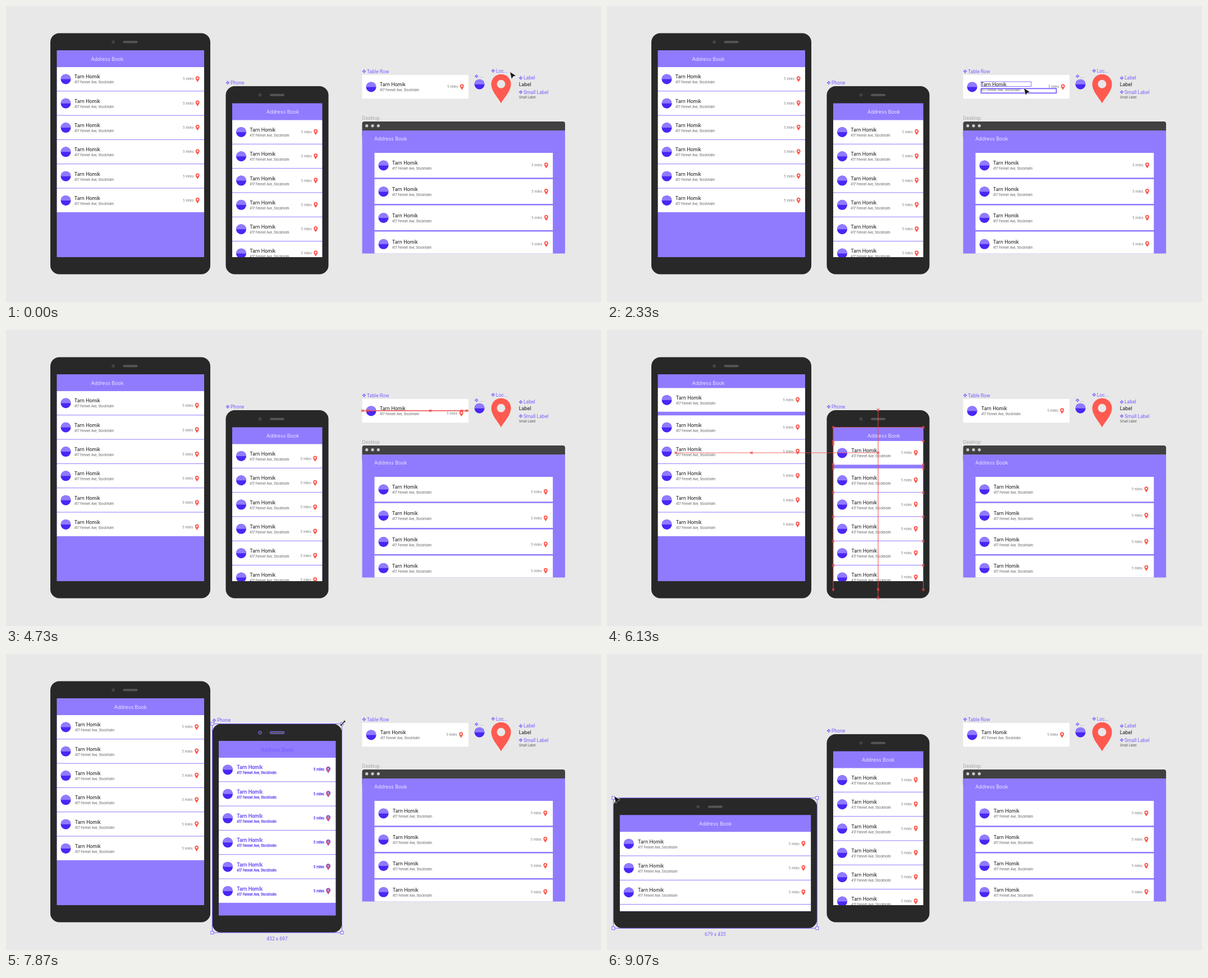
Write an HTML page that moves like this. It is 1060x528 px and loops after 9.13 s.

```html
<!DOCTYPE html>
<html lang="en">
<head>
<meta charset="utf-8">
<title>Address Book</title>
<style>
  html, body { margin: 0; width: 100%; height: 100%; overflow: hidden; background: #e8e8e8; }
  svg { display: block; width: 1060px; height: 528px; }
  text { font-family: Inter, sans-serif; }
  .title { font-size: 9px; font-weight: 300; fill: #fff; }
  .name { font-size: 8.5px; fill: #111; }
  .small { font-size: 5.55px; fill: #555; }
  .miles { font-size: 5.7px; fill: #777; }
  .tag { font-family: Roboto, sans-serif; font-size: 8.6px; fill: #7b61ff; }
  .outlined text { fill: #6248f2; stroke: #6248f2; stroke-width: .3px; }
  .outlined .title { fill: #806aff; stroke: #755eff; }
  .outlined .pin { stroke: #6248f2; stroke-width: 5px; }
  .outlined .detail { stroke: #7b61ff; stroke-width: 1px; }
</style>
</head>
<body>
<svg id="stage" viewBox="0 0 1060 528"></svg>
<script>
const LOOP = 9130;
const PURPLE = '#907bff', ACCENT = '#7b61ff', RED = '#ef4545', DARK = '#282828';
const PITCH = 43.3, ROW_HEIGHT = 42.3;
const PERSON = 'Tarn Homik', ADDRESS = '417 Fennet Ave, Stockholm';
const TABLET = [79, 48.5, 285, 430], TABLET_WIDE = [11.3, 256.7, 363, 232.5];
const PHONE = [391.5, 143, 183, 335.5], PHONE_LARGE = [367.5, 124.5, 231, 372.5];

const stage = document.getElementById('stage');
const mix = (a, b, k) => a + (b - a) * k;
const mixBox = (a, b, k) => a.map((v, i) => mix(v, b[i], k));
const between = (t, a, b) => t >= a && t < b;

function ease(t, start, end) {
  const k = Math.min(1, Math.max(0, (t - start) / (end - start)));
  return k * k * (3 - 2 * k);
}

// Eased position along a list of [time, x, y] stops.
function along(stops, t) {
  let i = 0;
  while (i < stops.length - 2 && t >= stops[i + 1][0]) i++;
  const [a, b] = [stops[i], stops[i + 1]], k = ease(t, a[0], b[0]);
  return [mix(a[1], b[1], k), mix(a[2], b[2], k)];
}

const rect = (x, y, w, h, fill, extra = '') =>
  `<rect x="${x}" y="${y}" width="${w}" height="${h}" fill="${fill}" ${extra}/>`;
const circle = (x, y, r, fill, extra = '') =>
  `<circle cx="${x}" cy="${y}" r="${r}" fill="${fill}" ${extra}/>`;
const text = (x, y, cls, value, extra = '') =>
  `<text x="${x}" y="${y}" class="${cls}" ${extra}>${value}</text>`;
const path = (d, extra) => `<path d="${d}" ${extra}/>`;
const line = (x1, y1, x2, y2, width = 1) =>
  path(`M${x1} ${y1}L${x2} ${y2}`, `stroke="${RED}" stroke-width="${width}"`);
const cross = (x, y) =>
  path(`M${x - 2} ${y - 2}l4 4m0 -4l-4 4`, `stroke="${RED}" stroke-width="1.1"`);

const avatar = (x, y, r = 9) => circle(x, y, r, '#4a26f5') +
  path(`M${x - r} ${y}a${r} ${r} 0 0 1 ${2 * r} 0z`, 'fill="#8f7bff"');

// A map pin whose origin is the middle of its full height.
const pin = (x, y, scale = 1) => `<g transform="translate(${x} ${y}) scale(${scale})">` +
  path('M0 26C-4 17-17.5 5-17.5-8.5A17.5 17.5 0 0 1 17.5-8.5C17.5 5 4 17 0 26Z' +
    'M7.5-8.5A7.5 7.5 0 0 0-7.5-8.5A7.5 7.5 0 0 0 7.5-8.5Z',
    'class="pin" fill="#ff5a50" fill-rule="evenodd"') + '</g>';

const diamond = (x, y) => path(`M${x} ${y - 1.5}l1.5 1.5l-1.5 1.5l-1.5 -1.5z`, `fill="${ACCENT}"`);
const tag = (x, y, label) => text(x + 8.4, y, 'tag', label) +
  [[0, -1.9], [1.9, 0], [0, 1.9], [-1.9, 0]].map(([dx, dy]) => diamond(x + 3.5 + dx, y - 3 + dy)).join('');

function row(x, y, w, h, pose) {
  const mid = y + h / 2, right = x + w - pose.inset;
  return rect(x, y, w, h, '#fff') + avatar(x + 16, mid + .3) +
    text(x + 31.3 + pose.shift, mid - .7, 'name', PERSON) +
    text(x + 31.3 + pose.shift, mid + 8.3, 'small', ADDRESS) +
    text(right - 18.8, mid + 2.3 + pose.drop, 'miles', '5 miles', 'text-anchor="end"') +
    pin(right - 11.8, mid + .3 + pose.drop, .2);
}

function device(id, [x, y, w, h], pose, outlined) {
  const sx = x + 11.5, sy = y + 30.5, sw = w - 22.5, sh = h - 61, cx = x + w / 2;
  let rows = '';
  for (let i = 5; i >= 0; i--) {
    rows += row(sx, sy + 30 + i * PITCH - (i ? 0 : pose.lift), sw, ROW_HEIGHT, pose);
  }
  const titleX = mix(sx + 90, sx + sw / 2, pose.center);
  return `<g class="${outlined ? 'outlined' : ''}">` +
    `<clipPath id="${id}">${rect(sx, sy, sw, sh, '#000')}</clipPath>` +
    rect(x, y, w, h, DARK, 'rx="16"') +
    circle(cx - 30.5, y + 15.7, 3, '#434343', 'class="detail"') +
    rect(cx - 13, y + 13.7, 26, 4, '#555', 'rx="2" class="detail"') +
    rect(sx, sy, sw, sh, PURPLE) +
    `<g clip-path="url(#${id})">${rows}</g>` +
    text(titleX, sy + 18.5, 'title', 'Address Book', 'text-anchor="middle"') + '</g>';
}

function desktop(pose) {
  const x = 634.5, y = 206, w = 361.5;
  let out = text(x, 202.5, 'tag', 'Desktop', 'style="fill:#aaa"') +
    rect(x, y, w, 30, '#414141', 'rx="4"') + rect(x, 222, w, 219.5, PURPLE);
  for (let i = 0; i < 3; i++) out += circle(642.7 + i * 10.3, 213.7, 2.6, '#c9c9c9');
  out += text(656.3, 240.3, 'title', 'Address Book') +
    `<clipPath id="window">${rect(x, y, w, 235.5, '#000')}</clipPath><g clip-path="url(#window)">`;
  for (let i = 0; i < 4; i++) out += row(656.5, 262 + i * 46.8, 317.7, 44.2, pose);
  return out + '</g>';
}

const components = pose =>
  tag(634.5, 119.6, 'Table Row') + row(634.5, 123, 189.5, 42.3, pose) +
  tag(834.7, 128.3, '...') + avatar(843.5, 139.7) +
  tag(864.3, 118.6, 'Loc...') + pin(882, 147.7) +
  tag(913.5, 131.4, 'Label') + text(913.7, 142.8, 'name', 'Label') +
  tag(913.5, 156.6, 'Small Label') + text(913.7, 165, 'small', 'Small Label');

function selection([x, y, w, h], label) {
  let out = rect(x, y, w, h, 'none', `stroke="${ACCENT}"`);
  for (const cx of [x, x + w]) for (const cy of [y, y + h]) {
    out += rect(cx - 2.5, cy - 2.5, 5, 5, '#fff', `stroke="${ACCENT}"`);
  }
  const size = `${Math.round(w * 1.87)} x ${Math.round(h * 1.871)}`;
  return out + (label ? text(x + w / 2, y + h + 13.5, 'tag', size, 'text-anchor="middle"') : '');
}

function rowGuides(t) {
  let out = line(634.5, 144, 824, 144, 1.3);
  for (const x of [635, 644, 756, 812, 821]) out += cross(x, 144);
  if (between(t, 3200, 3700)) {
    out += line(651, 144, 651, mix(144, 215, ease(t, 3200, 3400)));
  }
  return out;
}

function phoneGuides(t, lift) {
  const [left, mid, right, top] = [403, 483, 563.5, 173.5];
  let out = line(left, top, right, top, .7) + line(mid, 142.5, mid, 478.5);
  for (const x of [left, right]) {
    out += line(x, top, x, 463) + cross(x, top) + cross(x, 203.5 - lift) + cross(x, 246 - lift);
    for (let i = 1; i < 7; i++) out += cross(x, 203.5 + i * PITCH);
  }
  out += cross(left, 203.5);
  for (const y of [142.5, 219, 463, 478]) out += cross(mid, y);
  if (t >= 6130) {
    out += line(122.5, 219, mid, 219, .8) + cross(122.5, 219) + cross(257.5, 219);
  }
  return out;
}

const arrow = ([x, y]) => `<g transform="translate(${x} ${y})">` +
  path('M0 0L10 6.3L5.3 7.7L3 12Z', 'fill="#161616" stroke="#fff" stroke-width=".9" paint-order="stroke"') + '</g>';
const resizer = (x, y, turn) => `<g transform="translate(${x} ${y}) rotate(${turn})">` +
  path('M-7 0L-3.5-3V-1H3.5V-3L7 0L3.5 3V1H-3.5V3Z', 'fill="#161616" stroke="#fff" stroke-width=".7"') + '</g>';

const PICKING = [[0, 898, 118], [150, 898, 118], [930, 775, 149], [1500, 706, 140],
  [1730, 706, 140], [2250, 743, 147], [2730, 743, 147]];
const TO_PHONE = [[6700, 634, 168], [7000, 576, 142]];
const TO_TABLET = [[8000, 240, 90], [8250, 79, 48]];

function cursor(t, phone, tablet) {
  if (t < 2740) return arrow(along(PICKING, t));
  if (between(t, 6700, 7070)) return arrow(along(TO_PHONE, t));
  if (between(t, 7070, 8000)) return resizer(phone[0] + phone[2] + 1.5, phone[1] - 1, -45);
  if (between(t, 8000, 8250)) return arrow(along(TO_TABLET, t));
  if (between(t, 8250, 8880)) return resizer(tablet[0], tablet[1], 45);
  return t >= 8880 ? arrow([13, 254]) : '';
}

function scene(t) {
  const settle = ease(t, 5130, 5450);
  const pose = {
    drop: 4.8 * (ease(t, 4200, 4500) - settle),
    shift: settle,
    inset: ease(t, 4200, 4500) + .6 * settle,
    lift: 5.5 * (ease(t, 5500, 5900) - ease(t, 6350, 6650)),
    center: ease(t, 6450, 6850)
  };
  const phone = t < 8000 ? mixBox(PHONE, PHONE_LARGE, ease(t, 7130, 7800)) : PHONE;
  const tablet = mixBox(TABLET, TABLET_WIDE, ease(t, 8280, 8850));
  const phoneActive = between(t, 7070, 8000), tabletActive = t >= 8200;

  let out = rect(0, 0, 1060, 528, '#e8e8e8') +
    device('tablet', tablet, pose, between(t, 8280, 8850)) +
    device('phone', phone, pose, phoneActive) +
    tag(phone[0], phone[1] - 3.2, 'Phone') + components(pose) + desktop(pose);
  if (between(t, 1500, 2740)) {
    out += rect(666.3, 135, 89.5, 8.5, 'none', `stroke="${ACCENT}" stroke-width=".9"`);
  }
  if (between(t, 1930, 2740)) {
    out += rect(666.5, 147.3, 134, 8, 'none', `stroke="${ACCENT}" stroke-width="1.8"`);
  }
  if (between(t, 2870, 5070)) out += rowGuides(t);
  if (between(t, 5500, 6850)) out += phoneGuides(t, pose.lift);
  if (phoneActive) out += selection(phone, true);
  if (tabletActive) out += selection(tablet, t >= 8280);
  return out + cursor(t, phone, tablet);
}

const start = performance.now();
function play() {
  stage.innerHTML = scene((performance.now() - start) % LOOP);
  requestAnimationFrame(play);
}
play();
</script>
</body>
</html>
```
